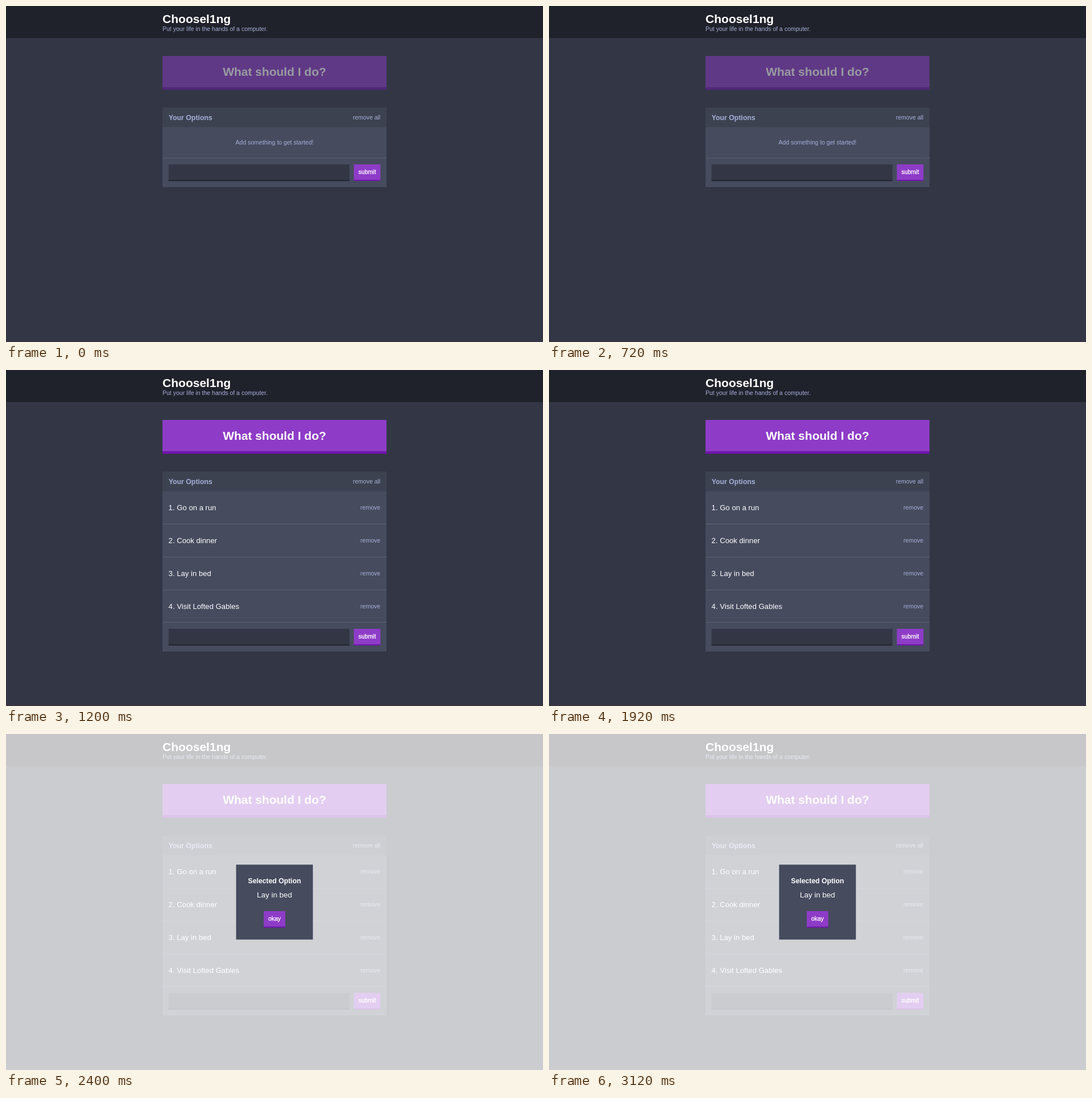
Write an HTML page that moves like this. It is 947 px wide and 592 px high and loops after 3.6 s.

```html
<!DOCTYPE html>
<html lang="en">
<head>
<meta charset="utf-8">
<title>Decision helper</title>
<style>
  html, body { margin: 0; width: 100%; height: 100%; overflow: hidden; background: #333745; }
  svg { display: block; width: 947px; height: 592px; font: 10.52px "Liberation Sans", Arial, sans-serif; }
  text { fill: #a5afd7; white-space: pre; }
  .white { fill: #fff; }
  .big { font-size: 21.04px; font-weight: bold; }
  .head { font-size: 12.31px; font-weight: bold; }
  .item { font-size: 13.15px; }
  .mid { text-anchor: middle; }
  .end { text-anchor: end; }
  .medium { stroke: #fff; stroke-width: .3px; }
  .purple { fill: #8e3cc8; }
  .edge { fill: #7612b4; }
  .panel { fill: #464b5e; }
  .rule { fill: #5c6177; }
</style>
</head>
<body>
<svg viewBox="0 0 947 592">
  <rect width="947" height="592" fill="#333745"/>
  <rect y="589.5" width="947" height="2.5" fill="#383443"/>

  <rect width="947" height="56.5" fill="#20222b"/>
  <text class="white big" x="276" y="29.5">Choosel1ng</text>
  <text x="276" y="43.6">Put your life in the hands of a computer.</text>

  <g id="decide">
    <rect class="purple" x="276" y="88" width="395" height="55.5"/>
    <rect class="edge" x="276" y="143.5" width="395" height="4"/>
    <text class="white big mid" x="473.5" y="123">What should I do?</text>
  </g>

  <rect class="panel" x="276" y="179" width="395" height="140"/>
  <g id="list"></g>
  <rect x="276" y="179" width="395" height="34.5" fill="#3d4251"/>
  <text class="head" x="286.8" y="200.7">Your Options</text>
  <text class="end" x="660.2" y="200">remove all</text>

  <g id="empty">
    <text class="mid" x="473.5" y="244">Add something to get started!</text>
    <rect class="rule" x="276" y="267.5" width="395" height="1"/>
  </g>

  <g id="form">
    <rect x="286.6" y="279" width="319" height="28" fill="#333745"/>
    <rect x="286.6" y="306.6" width="319" height="1.9" fill="#20222b"/>
    <rect class="purple" x="613.5" y="279" width="46.8" height="27.6"/>
    <rect class="edge" x="613.5" y="306.3" width="46.8" height="1.9"/>
    <text class="white medium mid" x="636.9" y="296.4">submit</text>
  </g>

  <g id="modal">
    <rect width="947" height="592" fill="#fff" opacity=".75"/>
    <rect class="panel" x="405.8" y="230.2" width="135.4" height="132"/>
    <text class="white head mid" x="473.5" y="262.6">Selected Option</text>
    <text class="white mid" x="473.5" y="287.6" font-size="13.4">Lay in bed</text>
    <rect class="purple" x="454.5" y="312" width="38" height="27.5"/>
    <rect class="edge" x="454.5" y="339.3" width="38" height="1.9"/>
    <text class="white medium mid" x="473.5" y="329.2">okay</text>
  </g>
</svg>
<script>
  const byId = id => document.getElementById(id);
  const options = ["Go on a run", "Cook dinner", "Lay in bed", "Visit Lofted Gables"];
  const rowHeight = 57.87;

  byId("list").innerHTML =
    '<rect class="panel" x="276" y="213" width="395" height="283"/>' +
    options.map((name, i) => {
      const y = 213.5 + i * rowHeight;
      return `<text class="white item" x="286.6" y="${y + 33.4}">${i + 1}. ${name}</text>
        <text class="end" x="660.2" y="${y + 32.6}">remove</text>
        <rect class="rule" x="276" y="${Math.round(y + rowHeight - .6)}" width="395" height="1"/>`;
    }).join("");

  // One value per state: empty, filled, answered.
  const steps = [
    ["decide", "opacity", [.5, 1, 1]],
    ["empty", "opacity", [1, 0, 0]],
    ["list", "opacity", [0, 1, 1]],
    ["form", "transform", ["none", "translateY(177px)", "translateY(177px)"]],
    ["modal", "opacity", [0, 0, 1]]
  ];

  for (const [id, prop, values] of steps) {
    const frames = [...values, values[2]].map((value, i) =>
      ({ [prop]: value, offset: i / 3, easing: "step-end" }));
    byId(id).animate(frames, { duration: 3600, iterations: Infinity });
  }
</script>
</body>
</html>
```
